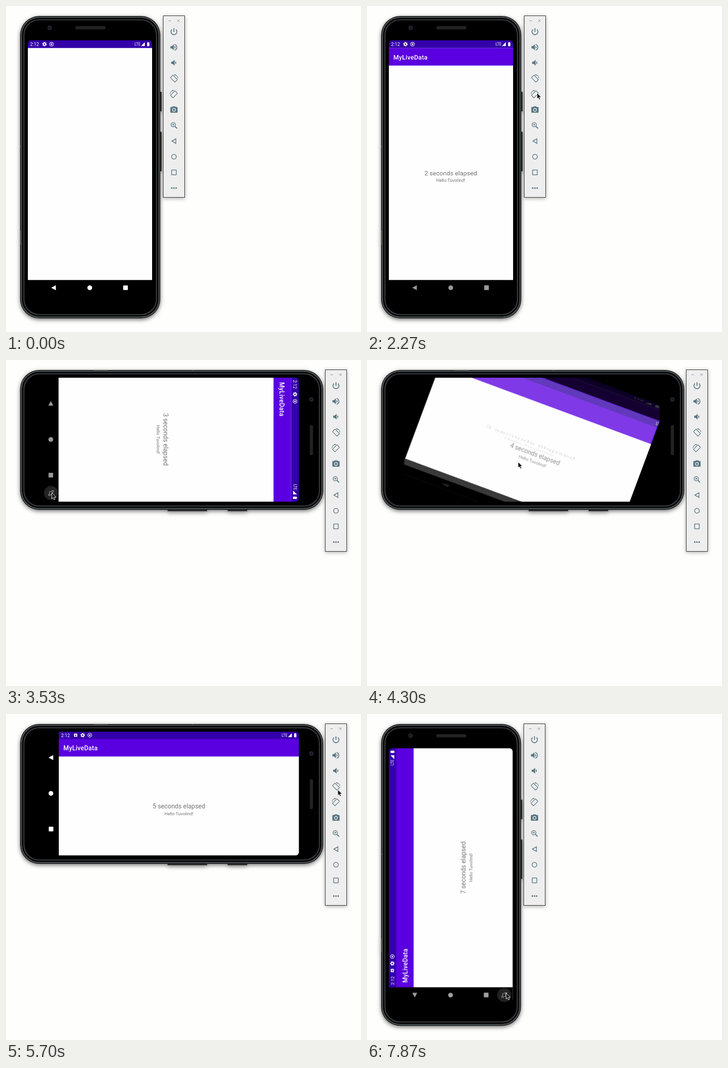
These frames come from a looping animation (780 by 718 pixels, 8000 ms). An HTML page:

```html
<!DOCTYPE html>
<html lang="en">
<head>
<meta charset="utf-8">
<title>MyLiveData</title>
<style>
html, body { margin: 0; width: 100%; height: 100%; overflow: hidden; background: #fefefd; }
svg { display: block; width: 780px; height: 718px; font-family: Roboto, sans-serif; }

.dev, .panel, .app, .n, .cursor, .old, .new, .curtain, .navP, .navL, .hintP, .hintL {
  animation: 8s linear infinite;
}
.shadow { filter: drop-shadow(0 3px 5px rgba(0, 0, 0, .55)); }
.shadow.soft { filter: drop-shadow(0 2px 4px rgba(0, 0, 0, .32)); }
.white { fill: #fff; }
.big { font-size: 13.9px; fill: #757575; text-anchor: middle; }
.small { font-size: 9.73px; fill: #757575; text-anchor: middle; }
.title { font-size: 13.9px; font-weight: 500; letter-spacing: .25px; fill: #fff; }
.line { fill: none; stroke: #587682; stroke-width: 1.5; }
.solid { fill: #587682; }

/* device orientation */
.dev { animation-name: dev; animation-timing-function: step-end; }
@keyframes dev {
  0%, 72.5% { transform: matrix(1, 0, 0, 1, 0, 0); }
  29% { transform: matrix(0, 1, -1, 0, 719, -9); }
  78.1%, 100% { transform: matrix(.998, 0, 0, .998, .06, .04); }
}
.panel { animation-name: panel; animation-timing-function: step-end; }
@keyframes panel {
  0%, 72.5% { transform: translateX(0); }
  29% { transform: translateX(356px); }
  78.1%, 100% { transform: translateX(-1px); }
}

/* screen rotation: the old picture stretches, turns and fades over the new one */
.old { transform-origin: 184.5px 356.5px; animation-name: old; }
@keyframes old {
  0% { transform: rotate(0deg) scale(1, 1); opacity: 1; }
  52.1% { transform: rotate(0deg) scale(1, 1); opacity: 1; animation-timing-function: cubic-bezier(.22, 1, .36, 1); }
  58.6%, 100% { transform: rotate(-90deg) scale(2.055, .487); opacity: 0; }
}
.new { transform-origin: 362.5px 175.5px; animation-name: new; }
@keyframes new {
  0% { transform: rotate(90deg); }
  52.1% { transform: rotate(90deg); animation-timing-function: cubic-bezier(.22, 1, .36, 1); }
  58.6%, 100% { transform: rotate(0deg); }
}
.curtain { animation-name: curtain; }
@keyframes curtain {
  0% { transform: translateX(var(--dx)); }
  52.1% { transform: translateX(var(--dx)); animation-timing-function: cubic-bezier(.22, 1, .36, 1); }
  58.6%, 100% { transform: translateX(0); }
}

.app { animation-name: app; }
@keyframes app { 0%, .88% { opacity: 0; } 2.2%, 100% { opacity: 1; } }
.navP { animation-name: navP; }
@keyframes navP { 0%, 8% { fill: #fff; } 15.5%, 100% { fill: #999; } }
.navL { animation-name: navL; }
@keyframes navL { 0%, 80.4% { fill: #fff; } 87%, 100% { fill: #a0a0a0; } }
.hintP { animation-name: hintP; }
@keyframes hintP { 0%, 37.9% { opacity: 0; } 39.5%, 52% { opacity: 1; } 52.1%, 100% { opacity: 0; } }
.hintL { animation-name: hintL; }
@keyframes hintL { 0%, 91.3% { opacity: 0; } 93%, 100% { opacity: 1; } }

/* seconds */
.n { opacity: 0; animation-timing-function: step-end; }
@keyframes n1 { 11.25% { opacity: 1; } 23.75% { opacity: 0; } }
@keyframes n2 { 23.75% { opacity: 1; } 36.6% { opacity: 0; } }
@keyframes n3 { 36.6%, 100% { opacity: 1; } }
@keyframes n4 { 0% { opacity: 1; } 61.3% { opacity: 0; } }
@keyframes n5 { 61.3% { opacity: 1; } 74.1% { opacity: 0; } }
@keyframes n6 { 74.1% { opacity: 1; } 86.3% { opacity: 0; } }
@keyframes n7 { 86.3%, 100% { opacity: 1; } }

.cursor { animation-name: cursor; animation-timing-function: ease-in-out; }
@keyframes cursor {
  0%, 1.2% { transform: translate(268px, -20px); }
  1.25% { transform: translate(268px, 4px); }
  5%, 7.1% { transform: translate(311px, 190px); }
  16.6%, 17.5% { transform: translate(369px, 168px); }
  18.7% { transform: translate(371px, 165px); }
  21.2%, 30.5% { transform: translate(373px, 191px); }
  37.4%, 37.9% { transform: translate(42px, 300px); }
  43.5%, 45.9% { transform: translate(100px, 292px); }
  49.6%, 52.1% { transform: translate(122px, 340px); }
  53.7%, 59.6% { transform: translate(331.5px, 224px); }
  62.5% { transform: translate(560px, 260px); }
  68.4%, 70% { transform: translate(745px, 232px); }
  71.1%, 73.7% { transform: translate(728.5px, 166px); }
  75.6%, 76.6% { transform: translate(726px, 159px); }
  80%, 80.4% { transform: translate(466px, 44px); }
  84.5% { transform: translate(320px, 300px); }
  90.4%, 91.2% { transform: translate(262px, 590px); }
  94.5% { transform: translate(288px, 628px); }
  98%, 100% { transform: translate(305px, 614px); }
}
</style>
</head>
<body>
<svg viewBox="0 0 780 718">
  <defs>
    <clipPath id="display"><rect x="48" y="75.5" width="273" height="561.5" rx="8"/></clipPath>
    <g id="gear">
      <circle r="2.7" fill="none" stroke="#fff" stroke-width="2"/>
      <circle r="4.1" fill="none" stroke="#fff" stroke-width="1.5" stroke-dasharray="2.1 2.19"/>
    </g>
    <g id="left" class="white">
      <use href="#gear" x="84.5" y="84"/>
      <circle cx="100" cy="84" r="4.2" fill="none" stroke="#fff" stroke-width="1.2"/>
      <circle cx="100" cy="84" r="1.8"/>
    </g>
    <g id="right" class="white">
      <text x="282.5" y="87.3" font-size="8.3">LTE</text>
      <path d="M296.5 88.3L305 79.8V88.3Z"/>
      <path d="M310 80.6H311.4V79.6H313.6V80.6H315V88.5H310Z"/>
    </g>
    <path id="back" d="M-5.2 0L5-5.4V5.4Z"/>
    <circle id="home" r="5.2"/>
    <rect id="recent" x="-5.1" y="-5.1" width="10.2" height="10.2" rx=".6"/>
    <g id="hint">
      <circle r="15.5" fill="#232222"/>
      <path d="M-3.2-3.5H3.2V3.5H-3.2ZM-5.5-1V-5.5H-2M5.5 1V5.5H2" fill="none" stroke="#aaa"/>
    </g>
    <g id="turn" class="solid" transform="scale(.78) translate(-12 -12)">
      <path d="M16.5 2.5A10.5 10.5 0 0 1 22.5 11H24A12 12 0 0 0 11.3 0L15.2 3.8Z"/>
      <rect x="7" y="3" width="10" height="18" rx="1" transform="rotate(-45 12 12)" fill="none" stroke="#587682" stroke-width="1.7"/>
    </g>
  </defs>

  <g class="shadow"><g class="dev">
    <path d="M338 189h4v43h-4zM338 277h4v87h-4z" fill="#2a2b2c"/>
    <rect x="31" y="22" width="308" height="666" rx="42" fill="#1a1c1d"/>
    <rect x="33.8" y="24.8" width="302.4" height="660.4" rx="39.2" fill="#0a0a0a" stroke="#565c5e" stroke-width="2"/>
    <rect x="39.5" y="30.5" width="291" height="649" rx="33.5" fill="#000" stroke="#4a4f51" stroke-width="1.6"/>
    <path d="M31 495v31" stroke="#aaa"/>
    <path d="M31 308v3" stroke="#aaa"/>
    <rect x="152.5" y="44.5" width="66" height="7" rx="3" fill="#232323"/>
    <circle cx="96" cy="48" r="5" fill="#24262a"/>
    <circle cx="96" cy="48" r="2.2" fill="#10122c"/>

    <g clip-path="url(#display)">
      <rect x="48" y="75" width="273" height="562"/>

      <!-- landscape layout -->
      <g transform="matrix(0 -1 1 0 9 719)"><g class="new">
        <rect x="82" y="39" width="562" height="273"/>
        <rect x="116" y="39" width="528" height="272.4" fill="#fefefe"/>
        <rect x="116" y="39" width="528" height="54.6" fill="#5a00e0"/>
        <rect x="116" y="39" width="528" height="16" fill="#3400a9"/>
        <text x="121" y="50.6" font-size="10" class="white">2:12</text>
        <path d="M149.5 43.3h7v7h-7zM152 48.8h2v-3.2h-2z" fill="#fff" fill-rule="evenodd"/>
        <use href="#left" x="84" y="-37.3"/>
        <use href="#right" x="323" y="-37.3"/>
        <text x="126" y="80.3" class="title">MyLiveData</text>
        <text x="380" y="208.3" class="big n" style="animation-name:n4">4 seconds elapsed</text>
        <text x="380" y="208.3" class="big n" style="animation-name:n5">5 seconds elapsed</text>
        <text x="380" y="208.3" class="big n" style="animation-name:n6">6 seconds elapsed</text>
        <text x="380" y="208.3" class="big n" style="animation-name:n7">7 seconds elapsed</text>
        <text x="380" y="222.6" class="small">Hello Tuvolind!</text>
        <g class="navL">
          <use href="#back" x="98.7" y="96"/>
          <use href="#home" x="98.7" y="174.8"/>
          <use href="#recent" x="99" y="253.3"/>
        </g>
        <g class="hintL"><use href="#hint" x="99" y="293"/></g>
        <rect class="curtain" style="--dx:144px" x="-218" y="-200" width="300" height="750"/>
        <rect class="curtain" style="--dx:-144px" x="644" y="-200" width="300" height="750"/>
      </g></g>

      <!-- portrait layout -->
      <g class="old">
        <rect x="48" y="75" width="273" height="562"/>
        <rect x="48" y="75" width="273" height="528.5" fill="#fefefe"/>
        <rect x="48" y="75" width="273" height="17.5" fill="#3400a9"/>
        <text x="53" y="88" font-size="10" class="white">2:12</text>
        <use href="#left"/>
        <use href="#right"/>
        <g class="app">
          <rect x="48" y="92.5" width="273" height="38.7" fill="#5a00e0"/>
          <text x="57.7" y="117.8" class="title">MyLiveData</text>
          <text x="184" y="387.6" class="small">Hello Tuvolind!</text>
        </g>
        <text x="184" y="373.2" class="big n" style="animation-name:n1">1 seconds elapsed</text>
        <text x="184" y="373.2" class="big n" style="animation-name:n2">2 seconds elapsed</text>
        <text x="184" y="373.2" class="big n" style="animation-name:n3">3 seconds elapsed</text>
        <g class="navP">
          <use href="#back" x="104.5" y="620.5"/>
          <use href="#home" x="184" y="620.5"/>
          <use href="#recent" x="262.6" y="620.5"/>
        </g>
        <g class="hintP"><use href="#hint" x="302" y="620"/></g>
      </g>
    </g>
  </g></g>

  <g class="panel">
    <rect class="shadow soft" x="345.5" y="21.5" width="47" height="400" fill="#eee" stroke="#222"/>
    <path d="M357 32.5h5.5M376.3 29.8l5 5M381.3 29.8l-5 5" stroke="#888" fill="none"/>
    <g transform="translate(369 0)">
      <path transform="translate(0 56.5)" class="line" style="stroke-width:1.9" d="M-4.4-4.8A6.6 6.6 0 1 0 4.4-4.8M0-7.5V.5"/>
      <path transform="translate(-10.2 81) scale(.83)" class="solid" d="M3 9v6h4l5 5V4L7 9zm13.5 3c0-1.8-1-3.3-2.5-4v8c1.5-.7 2.5-2.2 2.5-4zM14 3.2v2.1a7 7 0 0 1 0 13.4v2.1a9 9 0 0 0 0-17.6z"/>
      <path transform="translate(-10.2 115) scale(.83)" class="solid" d="M18.5 12c0-1.8-1-3.3-2.5-4v8c1.5-.7 2.5-2.2 2.5-4zM5 9v6h4l5 5V4L9 9z"/>
      <use href="#turn" y="160"/>
      <use href="#turn" transform="translate(0 194.5) scale(-1 1)"/>
      <g transform="translate(0 228.5)">
        <path class="solid" d="M-2.5-7.5H2.5L4-6H6.5Q8-6 8-4.5V5Q8 6.5 6.5 6.5H-6.5Q-8 6.5-8 5V-4.5Q-8-6-6.5-6H-4Z"/>
        <circle cy=".3" r="3.3" fill="#587682" stroke="#eee" stroke-width="1.5"/>
      </g>
      <g transform="translate(0 263)" class="line">
        <circle cx="-1.6" cy="-1.6" r="4.7"/>
        <path d="M-4-1.6H.8M-1.6-4V.8" stroke-width="1.1"/>
        <path d="M2 2L6.8 6.8" stroke-width="2.1"/>
      </g>
      <path transform="translate(0 297.5)" class="line" d="M-4.6 0L4.3-5.2V5.2Z"/>
      <circle cy="332" r="5.2" class="line"/>
      <rect x="-5.2" y="361.3" width="10.4" height="10.4" rx=".6" class="line"/>
      <path d="M-4.8 401h0M0 401h0M4.8 401h0" class="line" style="stroke-width:3.6;stroke-linecap:round"/>
    </g>
  </g>

  <g class="cursor">
    <path d="M.5.5V13.6L3.4 10.9L5.5 15.6L7.9 14.6L5.9 10H10Z" fill="#151515" stroke="#fff" stroke-width=".9"/>
  </g>
</svg>
</body>
</html>
```
